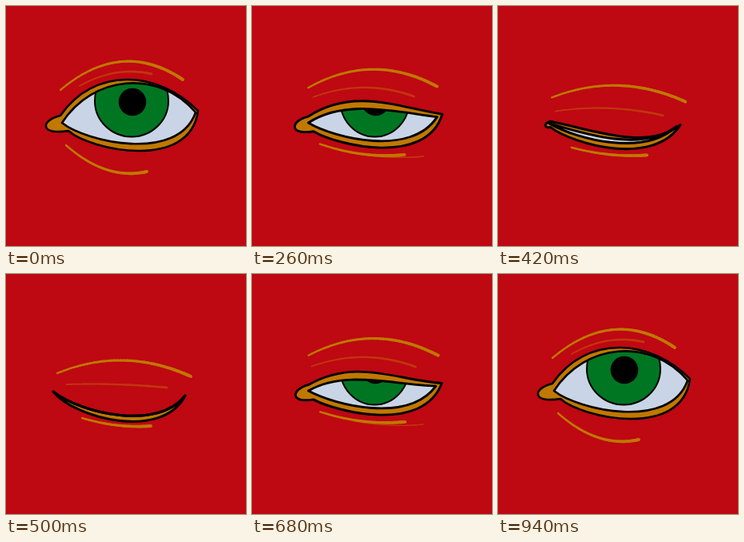
Recreate the animation shown at these times as an HTML page with a canvas. Size 300 by 300 pixels, loop 960 ms.

```html
<!DOCTYPE html>
<html>
<head>
<meta charset="utf-8">
<style>
html, body { margin: 0; width: 100%; height: 100%; overflow: hidden; background: #be0812; }
canvas { display: block; width: 300px; height: 300px; }
</style>
</head>
<body>
<canvas id="stage" width="300" height="300"></canvas>
<script>
const ctx = document.getElementById('stage').getContext('2d');
const LOOP = 960, STEP = 20;
const OPEN_AT = 20, NARROW_AT = 360, SHUT_AT = 460;
const RED = '#be0812', OCHRE = '#c07800', RUST = '#c2360e';
const GREEN = '#007622', WHITE = '#c9d5e6', BLACK = '#000';

// lid, gap: left corner, right corner, then the lower edge's handles from right to left.
// lidUp, gapUp: the upper edge's handles from left to right.
// Wrinkles: start, end, lift of the middle above the chord.
const open = {
  ink: 2.6, iris: [157, 46], duct: 36, ductDrop: [10, 19],
  lid: [68,137, 240,131, 230,207, 105,180], lidUp: [110,76, 190,80],
  gap: [70,146, 237,133, 215,196, 100,170], gapUp: [108,87, 190,78],
  brow: [68,105, 221,92, 29], fold: [92,100, 182,85, 9], bag: [75,174, 176,207, -14]
};
const narrow = {
  ink: 3, iris: [152, 42], duct: 24, ductDrop: [0, 18],
  lid: [75,140, 234,143, 195,189, 110,164], lidUp: [140,120, 180,162],
  gap: [71,146, 221,149, 170,176, 110,157], gapUp: [120,135, 165,165],
  brow: [72,100, 239,107, 17], fold: [67,122, 214,129, 13], bag: [87,172, 194,181, -4]
};
const shut = {
  ink: 3, iris: [152, 42], duct: 0, ductDrop: [0, 0],
  lid: [59,147, 224,152, 195,209, 85,180], lidUp: [95,175, 190,196],
  gap: [59,147, 224,152, 190,196, 95,175], gapUp: [95,175, 190,196],
  brow: [64,124, 231,128, 18], fold: [75,138, 201,142, 2], bag: [95,180, 181,190, -4]
};

// Upper lid leads, lower lid and corners follow late, the bag moves first.
const easing = {
  ink: 1, iris: 1, duct: 3, ductDrop: 3, lid: 3, gap: 3,
  lidUp: 1.6, gapUp: 1.4, brow: 1.6, fold: 1.3, bag: 0.6
};

const progress = (t, a, b) => Math.max(0, Math.min(1, (t - a) / (b - a)));
const mix = (a, b, k) => Array.isArray(a) ? a.map((v, i) => mix(v, b[i], k)) : a + (b - a) * k;

function poseAt(closing, shutting) {
  const pose = {};
  for (const key in open) {
    const half = mix(open[key], narrow[key], closing ** easing[key]);
    pose[key] = mix(half, shut[key], shutting);
  }
  return pose;
}

function almond(edge, up, duct = 0, drop = [0, 0]) {
  const [x, y, rightX, rightY, ...low] = edge;
  const [dx, dy] = drop;
  const path = new Path2D();
  path.moveTo(x, y);
  path.bezierCurveTo(...up, rightX, rightY);
  path.bezierCurveTo(...low, x + dx, y + dy);
  path.bezierCurveTo(x + dx - duct, y + dy + duct / 6, x - duct * 0.7, y + duct / 6, x, y);
  path.closePath();
  return path;
}

function wrinkle([x0, y0, x1, y1, lift], color, width) {
  const steps = 40;
  const point = t => [mix(x0, x1, t), mix(y0, y1, t) - 4 * lift * t * (1 - t)];
  ctx.strokeStyle = color;
  for (let i = 0; i < steps; i++) {
    ctx.lineWidth = width * mix(0.65, 1.1, i / steps);
    ctx.beginPath();
    ctx.moveTo(...point(i / steps));
    ctx.lineTo(...point((i + 1) / steps));
    ctx.stroke();
  }
}

function oval(x, y, rx, ry, color) {
  ctx.beginPath();
  ctx.ellipse(x, y, rx, ry, 0, 0, 2 * Math.PI);
  ctx.fillStyle = color;
  ctx.fill();
}

function drawEye(pose) {
  const lid = almond(pose.lid, pose.lidUp, pose.duct, pose.ductDrop);
  const gap = almond(pose.gap, pose.gapUp);
  const [irisX, irisWidth] = pose.iris;
  ctx.fillStyle = OCHRE;
  ctx.fill(lid);
  ctx.save();
  ctx.clip(gap);
  ctx.fillStyle = WHITE;
  ctx.fill(gap);
  oval(irisX, 118.5, irisWidth, 45, GREEN);
  ctx.strokeStyle = BLACK;
  ctx.lineWidth = 2;
  ctx.stroke();
  oval(irisX + 1, 120, 17.3, 17.3, BLACK);
  ctx.restore();
  ctx.lineWidth = pose.ink;
  ctx.strokeStyle = BLACK;
  ctx.stroke(gap);
  ctx.stroke(lid);
}

function draw(now) {
  const t = Math.floor(now % LOOP / STEP) * STEP;
  const blink = Math.min(t, LOOP - t);
  const closing = progress(blink, OPEN_AT, NARROW_AT);
  const pose = poseAt(closing, progress(blink, NARROW_AT, SHUT_AT));
  const creaseWidth = 2.8 * Math.sin(Math.PI * closing ** 0.65);

  ctx.fillStyle = RED;
  ctx.fillRect(0, 0, 300, 300);
  ctx.lineCap = ctx.lineJoin = 'round';
  wrinkle(pose.fold, RUST, 2.6);
  if (creaseWidth > 0.1) wrinkle([127, 184, 214, 188, -3], RUST, creaseWidth);
  wrinkle(pose.brow, OCHRE, 3.6);
  wrinkle(pose.bag, OCHRE, 3.6);
  drawEye(pose);
}

const start = performance.now();
function tick() {
  draw(performance.now() - start);
  requestAnimationFrame(tick);
}
tick();
</script>
</body>
</html>
```
